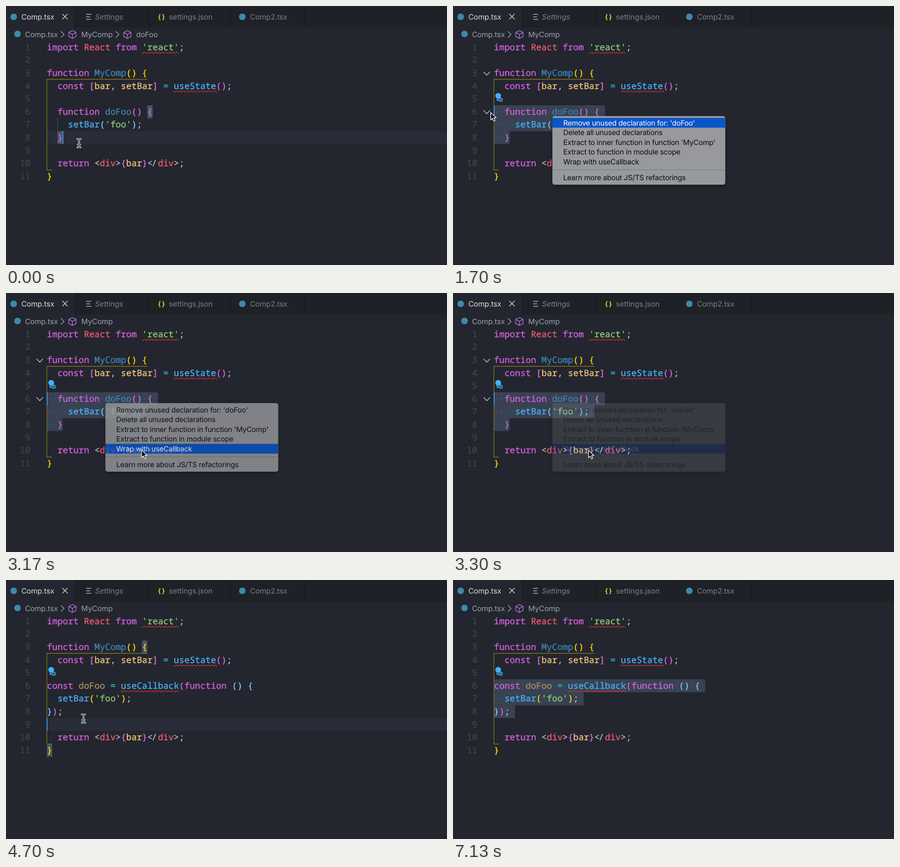
Recreate the animation shown at these times as an HTML page. Size 976 by 574 pixels, loop 7.16 s.

```html
<!DOCTYPE html>
<html lang="en">
<head>
<meta charset="utf-8">
<title>Wrap with useCallback</title>
<style>
  html, body { margin: 0; width: 100%; height: 100%; overflow: hidden; background: #23262e; }
  svg { display: block; position: absolute; left: 0; top: 0; }
  text { white-space: pre; text-rendering: geometricPrecision; }
  .code { font: 19.5px "Noto Sans Mono", "DejaVu Sans Mono", monospace; stroke-width: .4; }
  .ui { font: 16.4px Inter, "Liberation Sans", sans-serif; letter-spacing: -.12px; }
  .item { font: 16px Inter, "Liberation Sans", sans-serif; letter-spacing: -.26px; }
  .line { fill: none; stroke-linecap: round; stroke-linejoin: round; }
</style>
</head>
<body>
<svg id="stage" width="976" height="574" viewBox="0 0 976 574"></svg>
<script>
const LOOP = 7160, LEFT = 90.5, ADV = 11.7, TOP = 77, ROW = 28.6;
const APPLY = 3480, CLICK = 4460, DRAG = 5150;
const colors = {
  p: '#d55fde', r: '#ef596f', g: '#89ca78', w: '#b4bac5', y: '#edc279', m: '#a98d62',
  c: '#2bbac5', b: '#49aef6', d: '#3d83b5', 1: '#ffd70a', 2: '#e066d8', 3: '#7cc9fb'
};

// Each token is a colour key followed by its text.
const before = [
  "pimport |rReact |pfrom |g'react'|w;",
  '',
  'pfunction |dMyComp|1() {',
  'p  const |2[|ybar|w, |ysetBar|2]|c = |buseState|2()|w;',
  '',
  'p  function |ddoFoo|2() {',
  "b    setBar|3(|g'foo'|3)|w;",
  '2  }',
  '',
  'p  return |w<|rdiv|w>|2{|ybar|2}|w</|rdiv|w>;',
  '1}'
];
const after = before.slice();
after.splice(5, 3,
  'pconst |mdoFoo|c = |buseCallback|2(|pfunction |3() {',
  "b  setBar|1(|g'foo'|1)|w;",
  '3}|2)|w;');

const plain = lines => lines.map(s => s && s.split('|').map(k => k.slice(1)).join(''));
const plainBefore = plain(before), plainAfter = plain(after);

const colX = c => LEFT + c * ADV;
const rowY = r => TOP + (r - 1) * ROW;
const baseY = r => rowY(r) + 20.7;
const clamp = (v, a, b) => Math.min(b, Math.max(a, v));
const fade = (t, a, b) => clamp((t - a) / (b - a), 0, 1);

const rect = (x, y, w, h, fill, more = '') =>
  `<rect x="${x}" y="${y}" width="${w}" height="${h}" fill="${fill}" ${more}/>`;
const line = (d, color, width = 1.5, more = '') =>
  `<path class="line" d="${d}" stroke="${color}" stroke-width="${width}" ${more}/>`;
const label = (x, y, s, fill, cls = 'ui', more = '') =>
  `<text class="${cls}" x="${x}" y="${y}" fill="${fill}" ${more}>${s.replace(/</g, '&lt;')}</text>`;
const code = (x, y, s, fill, more = '') => label(x, y, s, fill, 'code', `stroke="${fill}" ${more}`);
const group = (id, body = '') => `<g id="${id}">${body}</g>`;

function codeLine(src, row) {
  let col = 0, out = '';
  const put = (c, s, fill) => out += code(colX(c).toFixed(2), baseY(row), s, fill);
  for (const token of src ? src.split('|') : []) {
    const s = token.slice(1), fill = colors[token[0]];
    const pad = s.length - s.trimStart().length;
    if (s === '</') {
      put(col, '<', fill);
      put(col + .8, '/', fill);
    } else {
      put(col + pad, s.trim(), fill);
    }
    col += s.length;
  }
  return out;
}
const codeBlock = (lines, from, to) =>
  lines.slice(from - 1, to).map((s, i) => codeLine(s, from + i)).join('');

function squiggle(row, c0, c1) {
  const waves = Math.floor((c1 - c0) * ADV / 7.8);
  return line(`M${colX(c0)} ${rowY(row) + 26.4}l2.3 1.9` + 'l3.9 -3.2l3.9 3.2'.repeat(waves), '#d92d2f', 1.3);
}
const badge = (x, y) => `<circle cx="${x}" cy="${y}" r="7.3" fill="#3f89ab"/>`;
const cube = x => line(`M${x} 54.3l8 4.2v9l-8 4.6l-8 -4.6v-9zm-8 4.2l8 4.4l8 -4.4m-8 4.4v9.2`, '#b46fdb', 1.5);
const crumbArrow = x => line(`M${x} 56.5l6.5 6.5l-6.5 6.5`, '#a0a5ae', 1.5);
const foldMark = y => line(`M68 ${y}l6.8 6.8l6.8 -6.8`, '#c3c6cb', 1.5);

const menuItems = [
  "Remove unused declaration for: 'doFoo'",
  'Delete all unused declarations',
  "Extract to inner function in function 'MyComp'",
  'Extract to function in module scope',
  'Wrap with useCallback',
  'Learn more about JS/TS refactorings'
];
const itemY = i => 248 + i * 21.6 + (i === 5 ? 13.4 : 0);

function tabs() {
  const edges = [153, 316, 497, 661];
  return rect(0, 0, 976, 48, '#1e2126') + rect(0, 0, 153, 48, '#23262e') +
    edges.map(x => rect(x - .7, 0, 1.4, 48, '#181b20')).join('') +
    badge(17, 24) + label(34, 30, 'Comp.tsx', '#dcdee2') +
    line('M125 18l11 11m0 -11l-11 11', '#d5d7da', 1.5) +
    line('M177.5 18.5h11m-11 5.5h8.5m-8.5 5.5h11', '#b9bcc2', 1.6, 'style="stroke-linecap:butt"') +
    label(197, 30, 'Settings', '#7c8088', 'ui', 'style="font-style:italic"') +
    label(335, 29, '{}', '#e5cf3c', 'code', 'style="font-size:15px;font-weight:700"') +
    label(360.5, 30, 'settings.json', '#7c8088') +
    badge(523, 24) + label(540, 30, 'Comp2.tsx', '#7c8088');
}

function crumbs() {
  const tone = '#9da2ab';
  return badge(25.5, 62) + label(42, 69, 'Comp.tsx', tone) + crumbArrow(122) +
    cube(147) + label(166.5, 69, 'MyComp', tone) +
    group('crumb', crumbArrow(243.5) + cube(268.5) + label(288, 69, 'doFoo', tone));
}

function bulb() {
  const blue = '#45b0fa';
  return `<circle cx="100" cy="199" r="6.3" fill="${blue}"/>` +
    line('M97.6 204v5h3.4', blue, 1.8) +
    `<circle cx="105.7" cy="207.8" r="3.6" fill="#23262e" stroke="${blue}" stroke-width="1.8"/>` +
    `<circle cx="105.7" cy="207.8" r="1.2" fill="${blue}"/>`;
}

function menu() {
  return rect(220, 244, 382.5, 152, '#97999d', 'rx="5" filter="url(#shadow)"') +
    rect(220, 362.3, 382.5, 1.6, '#7f8287') +
    rect(220, 248, 382.5, 21.6, '#0a55c8', 'id="pick"') +
    menuItems.map((s, i) => label(244, itemY(i) + 16.5, s, '#0c0d10', 'item')).join('');
}

const beamShape = 'M-3.8 -9.3q3.8 0 3.8 2.6v13.4q0 2.6 -3.8 2.6m7.6 -18.6q-3.8 0 -3.8 2.6m0 13.4q0 2.6 3.8 2.6m-6.6 -6.2h5.6';
const numbers = before.map((_, i) =>
  label(53.8, baseY(i + 1), String(i + 1), '#434954', 'code', 'text-anchor="end"')).join('');

document.getElementById('stage').innerHTML =
  '<defs><filter id="shadow" x="-10%" y="-20%" width="120%" height="150%">' +
  '<feDropShadow dx="0" dy="4" stdDeviation="6" flood-opacity=".3"/></filter></defs>' +
  rect(0, 0, 976, 574, '#23262e') + tabs() + crumbs() + numbers + group('marks') +
  line('M312.5 162.5H90.5V363.5H101.5', '#8d7912', 1.3, 'style="stroke-linecap:butt"') +
  codeBlock(before, 1, 5) + codeBlock(before, 9, 11) + squiggle(1, 18, 25) + squiggle(4, 24, 32) +
  group('old', rect(113.6, 249, 1.2, 28, '#4b515d', 'id="guide"') + codeBlock(before, 6, 8)) +
  group('new', codeBlock(after, 6, 8)) + group('wave', squiggle(6, 14, 25)) +
  group('folds', foldMark(146.3) + foldMark(231.8)) + group('bulb', bulb()) +
  rect(0, 0, 2, 28.6, '#3f8cf5', 'id="caret"') + group('menu', menu()) +
  group('beam', line(beamShape, '#f2f2f2', 3.4) + line(beamShape, '#15171b', 1.2)) +
  group('arrow', '<path d="M0 0V16.5L3.9 12.9L6.6 19L9.5 17.8L6.9 11.8H12z" fill="#0b0c0e" stroke="#f4f4f4" stroke-width="1.4" stroke-linejoin="round"/>');

const el = id => document.getElementById(id);
const show = (id, alpha) => el(id).setAttribute('opacity', +alpha);
const move = (id, x, y) => el(id).setAttribute('transform', `translate(${x.toFixed(2)} ${y.toFixed(2)})`);
const itemEls = [...document.querySelectorAll('.item')];

const smooth = k => k * k * (3 - 2 * k), linear = k => k, speedUp = k => k * k;
const path = [
  [0, 161.5, 304], [180, 161.5, 304], [680, 83.5, 236, smooth], [1800, 83.5, 236],
  [2350, 301.5, 345.5, smooth], [2950, 301.5, 345.5], [3250, 299.8, 348.5, smooth], [3650, 299.8, 348.5],
  [4350, 171.5, 307, smooth], [DRAG, 171.5, 307], [5560, 83.5, 238, smooth], [6130, 83.5, 238],
  [6370, 692, 130, speedUp], [6490, 880, 42], [6610, 847, 2], [LOOP, 847, 2]
];

function pointer(t) {
  const i = path.findIndex(p => p[0] > t);
  const [t0, x0, y0] = path[i - 1], [t1, x1, y1, ease = linear] = path[i];
  const k = ease((t - t0) / (t1 - t0));
  return { x: x0 + (x1 - x0) * k, y: y0 + (y1 - y0) * k };
}

// Anchor and caret as [row, column]
function selection(t, mouse, text) {
  const row = clamp(Math.floor((mouse.y - TOP) / ROW) + 1, 6, 9);
  const under = [row, clamp(Math.round((mouse.x - LEFT) / ADV), 0, text[row - 1].length)];
  if (t < APPLY) return [[8, 3], t < 700 ? under : [6, 0]];
  if (t < CLICK) return [[8, 3], [6, 0]];
  return [[9, 0], t < DRAG ? [9, 0] : t < 5560 ? under : [6, 0]];
}

function marks(anchor, caret, text) {
  const same = anchor[0] === caret[0] && anchor[1] === caret[1];
  let out = '';
  if (same) {
    out += rect(LEFT, rowY(caret[0]), 976 - LEFT, ROW, '#292d39');
    const pair = caret[0] === 8 ? [[6, 19], [8, 2]] : [[3, 18], [11, 0]];
    for (const [r, c] of pair) out += rect(colX(c), rowY(r), ADV, ROW, '#4b5364');
    return out;
  }
  const [a, b] = [anchor, caret].sort((p, q) => p[0] - q[0] || p[1] - q[1]);
  for (let r = a[0]; r <= b[0]; r++) {
    const s = text[r - 1], c0 = r === a[0] ? a[1] : 0;
    const end = r === b[0] ? b[1] : s.length, c1 = end + (r < b[0] ? 1 : 0);
    if (c1 === c0) continue;
    out += rect(colX(c0), rowY(r), (c1 - c0) * ADV, ROW + .2, '#384252', 'rx="3"');
    for (let c = c0; c < end; c++)
      if (s[c] === ' ') out += `<circle cx="${colX(c + .5)}" cy="${rowY(r) + 14.5}" r="1.3" fill="#515b6b"/>`;
  }
  return out;
}

function caretShown(t) {
  if (t >= 5560) return (t - 5560) % 1000 < 500;
  return !(t > CLICK + 500 && t < DRAG);
}

function draw(t) {
  const mouse = pointer(t), applied = t >= APPLY;
  const text = applied ? plainAfter : plainBefore;
  const [anchor, caret] = selection(t, mouse, text);
  el('marks').innerHTML = marks(anchor, caret, text);

  show('crumb', t < 600);
  show('old', !applied);
  show('new', applied);
  show('guide', t < 400 ? 1 : .5);
  show('wave', t >= 3900);
  show('bulb', t >= 900);
  show('folds', t < 3000 ? fade(t, 560, 760) :
    t < 5000 ? 1 - fade(t, 3650, 4100) : fade(t, 5450, 5650) * (1 - fade(t, 6380, 6850)));

  move('caret', colX(caret[1]) - .5, rowY(caret[0]));
  show('caret', caretShown(t));

  show('menu', t < 1400 ? 0 : 1 - fade(t, 3130, 3340));
  const picked = mouse.x < 220 ? 0 : clamp(Math.floor((mouse.y - 248) / 21.6), 0, 4);
  el('pick').setAttribute('y', itemY(picked));
  itemEls.forEach((n, i) => n.setAttribute('fill', i === picked ? '#fff' : '#0c0d10'));

  const gone = t >= 6630;
  const isArrow = t > 1400 && t < 3600 || mouse.x < 90 || mouse.y < 48;
  show('arrow', !gone && isArrow);
  show('beam', !gone && !isArrow);
  move('arrow', mouse.x, mouse.y);
  move('beam', mouse.x, mouse.y);
}

function tick() {
  draw(performance.now() % LOOP);
  requestAnimationFrame(tick);
}
tick();
</script>
</body>
</html>
```
